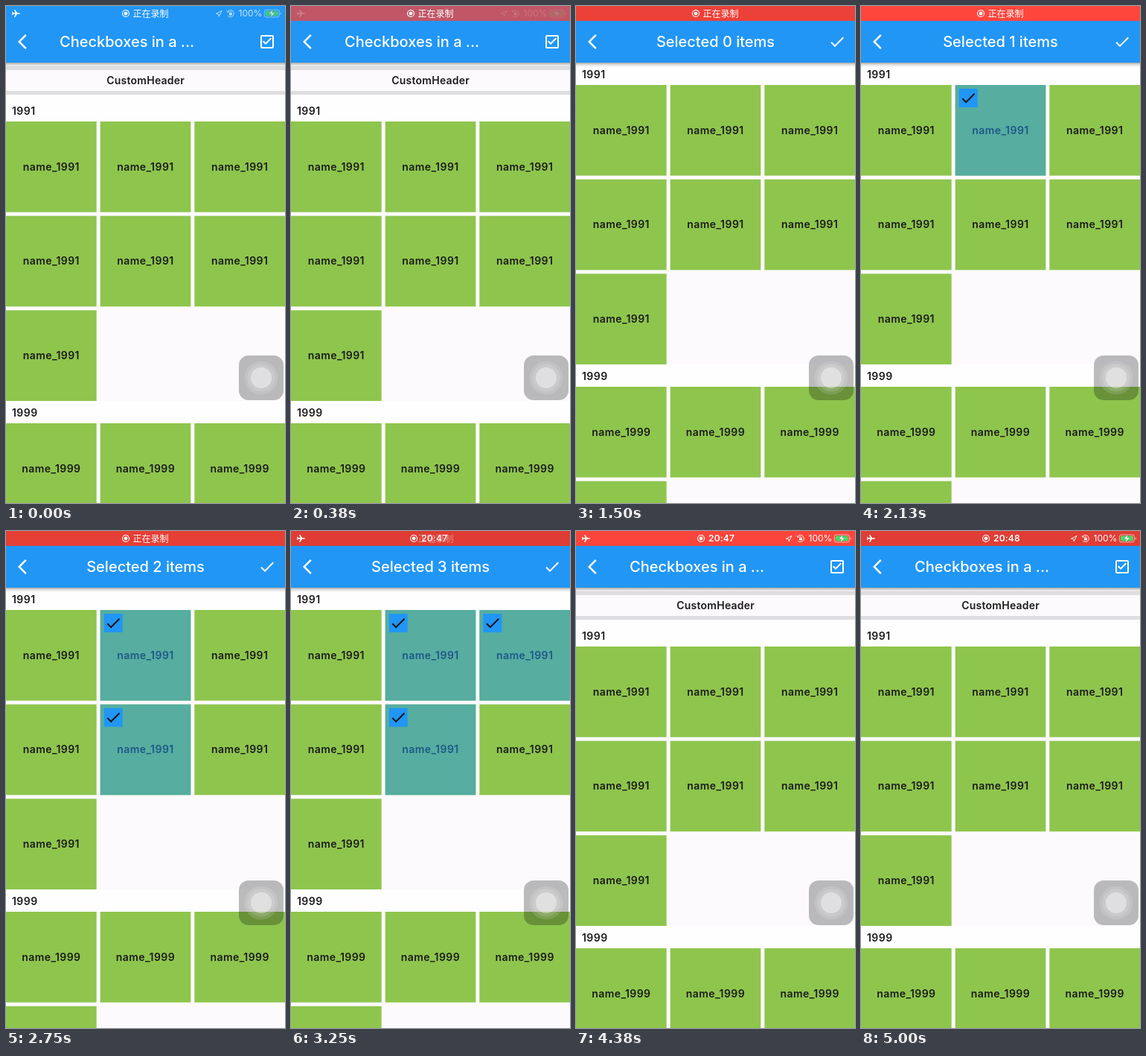
Recreate the animation shown at these times as an HTML page. Size 375 px wide and 667 px high, loop 5.12 s.

```html
<!DOCTYPE html>
<html lang="en">
<head>
<meta charset="utf-8">
<title>Checkbox grid</title>
<style>
html, body { margin: 0; width: 100%; height: 100%; overflow: hidden; background: #fcfafd; }
svg { display: block; width: 375px; height: 667px; }
text { font-family: Inter, Roboto, sans-serif; }
.label { font-size: 14px; font-weight: 600; letter-spacing: .45px; fill: #1b1b1b; }
.title { font-size: 20px; font-weight: 500; fill: #fff; }
.bar { font-size: 12px; fill: #fff; }
.cjk { font-family: "Noto Sans CJK SC", "Noto Sans CJK", sans-serif; }
.clock { font-weight: 600; letter-spacing: .2px; }
.mid { text-anchor: middle; }
</style>
</head>
<body>
<svg id="stage" viewBox="0 0 375 667">
  <defs>
    <linearGradient id="shade" x2="0" y2="1">
      <stop offset="0" stop-opacity=".34"/>
      <stop offset=".45" stop-opacity=".12"/>
      <stop offset="1" stop-opacity="0"/>
    </linearGradient>
    <path id="tick" d="M9 16.17L4.83 12l-1.42 1.41L9 19 21 7l-1.41-1.41z"/>
  </defs>
  <rect width="375" height="667" fill="#fcfafd"/>
  <g id="custom">
    <rect y="76" width="375" height="5" fill="#fafafa"/>
    <rect y="81" width="375" height="5" fill="#dedde0"/>
    <rect y="114" width="375" height="5" fill="#dedde0"/>
    <rect y="119" width="375" height="6" fill="#fefefe"/>
    <text class="label mid" x="187.7" y="105" style="letter-spacing:.25px">CustomHeader</text>
  </g>
  <g id="list"></g>
  <rect y="76" width="375" height="6" fill="url(#shade)"/>

  <rect y="20" width="375" height="56" fill="#2196f5"/>
  <path transform="translate(16 36)" fill="#fff" d="M11.67 3.87L9.9 2.1 0 12l9.9 9.9 1.77-1.77L3.54 12z"/>
  <g id="plain">
    <text class="title" x="72" y="55">Checkboxes in a ...</text>
    <g transform="translate(339 36)" fill="none" stroke="#fff" stroke-width="2">
      <rect x="4" y="4" width="16" height="16" rx="1"/>
      <path d="M6.7 11.3L10 14.6 17.3 7.3"/>
    </g>
  </g>
  <g id="picking">
    <text id="count" class="title mid" x="187.5" y="55"></text>
    <use href="#tick" x="339" y="36" fill="#fff"/>
  </g>

  <rect width="375" height="20" fill="#2196f5"/>
  <rect id="red" width="375" height="20"/>
  <path id="plane" fill="#fff" transform="translate(7.5 4.5)"
    d="M11.5 5.5Q11.5 4.7 10.4 4.7H7.6L4.7 .5H3.5L5 4.7H2.4L1.3 3.3H.4L1 5.5 .4 7.7H1.3L2.4 6.3H5L3.5 10.5H4.7L7.6 6.3H10.4Q11.5 6.3 11.5 5.5z"/>
  <g id="rec">
    <circle cy="10" r="4.5" fill="none" stroke="#fff" stroke-width="1.1"/>
    <circle cy="10" r="2.4" fill="#fff"/>
  </g>
  <text id="recText" class="bar cjk" x="170.5" y="14.5">正在录制</text>
  <text id="clock" class="bar clock" y="14.4"></text>
  <g id="right">
    <path d="M282.3 10.3L290 6.4 286.2 14 285.7 10.8z" fill="none" stroke="#fff" stroke-width=".9"/>
    <g fill="none" stroke="#fff">
      <path d="M298 7.3A4.6 4.6 0 1 1 298.2 13.1M296.7 6.3L298 8.6 300.2 7.5" stroke-width=".9"/>
      <path d="M300.8 9.7V8.7A1.1 1.1 0 0 1 303 8.7V9.7" stroke-width=".8"/>
    </g>
    <rect x="300" y="9.6" width="3.8" height="3" rx=".5" fill="#fff"/>
    <text class="bar" x="312.5" y="14.3">100%</text>
    <rect x="347.3" y="5" width="20" height="10" rx="2.6" fill="none" stroke="#fff" stroke-opacity=".6"/>
    <rect x="348.8" y="6.5" width="17" height="7" rx="1.4" fill="#4cd964"/>
    <path d="M368.7 8.2Q370 8.8 370 10T368.7 11.8z" fill="#fff" opacity=".6"/>
    <path d="M359 4.5L353 10.7H356.7L355.2 15.5 361.6 9.1H357.8z" fill="#fff" stroke="#2b8f55" stroke-width=".5"/>
  </g>

  <rect x="313" y="469" width="60" height="60" rx="13" fill="#000" fill-opacity=".265"/>
  <g fill="#fff">
    <circle cx="343" cy="499" r="22.5" fill-opacity=".13"/>
    <circle cx="343" cy="499" r="18.5" fill-opacity=".13"/>
    <circle cx="343" cy="499" r="14" fill-opacity=".4"/>
  </g>
</svg>
<script>
const LOOP = 5120, STEP = 125;
const ENTER = 1130, LEAVE = 4380, SHIFT = -49;
const TILE = 365 / 3, PITCH = TILE + 5;
// tile index in the first section -> time it is ticked
const picks = { 1: 1880, 4: 2380, 2: 2880, 3: 3500 };

const $ = id => document.getElementById(id);
const list = $('list');
const overlays = {};

function add(parent, tag, attrs, text) {
  const el = document.createElementNS('http://www.w3.org/2000/svg', tag);
  for (const key in attrs) el.setAttribute(key, attrs[key]);
  if (text) el.textContent = text;
  parent.appendChild(el);
  return el;
}

function section(year, top, total) {
  add(list, 'rect', { y: top, width: 375, height: 30, fill: '#fefefe' });
  add(list, 'text', { class: 'label', x: 8, y: top + 21 }, year);
  for (let i = 0; i < total; i++) {
    const x = i % 3 * PITCH, y = top + 30 + Math.floor(i / 3) * PITCH;
    const box = { x, y, width: TILE, height: TILE };
    add(list, 'rect', { ...box, fill: '#8ec54d' });
    add(list, 'text', { class: 'label mid', x: x + TILE / 2, y: y + 65.6 }, 'name_' + year);
    if (year === '1991' && picks[i]) {
      const g = overlays[i] = add(list, 'g', {});
      add(g, 'rect', { ...box, fill: '#2196f3', 'fill-opacity': .5 });
      add(g, 'rect', { x: x + 5, y: y + 5, width: 25, height: 25, fill: '#2196f5' });
      add(g, 'use', { href: '#tick', x: x + 5.5, y: y + 5.5, fill: '#141414' });
    }
  }
}
section('1991', 125, 7);
section('1999', 530, 4);

const ramp = (t, a, b) => Math.min(1, Math.max(0, (t - a) / (b - a)));
const show = (el, on) => el.setAttribute('display', on ? 'inline' : 'none');
const fade = (id, value) => $(id).setAttribute('opacity', value);

function statusBar(t) {
  const start = ramp(t, 0, 500);
  const swap = ramp(t, 3060, 3380);
  const pulse = (1 - Math.cos((t - 1000) / 2100 * 2 * Math.PI)) / 2;
  const mix = (a, b) => Math.round(a + (b - a) * pulse);
  $('red').setAttribute('fill', `rgb(${mix(220, 255)},${mix(60, 70)},${mix(52, 61)})`);
  fade('red', start);
  fade('plane', t < 2000 ? 1 - start : ramp(t, 3000, 3250));
  fade('right', t < 2000 ? .75 * (1 - start) : ramp(t, 3250, 3500));
  fade('recText', 1 - swap);
  fade('clock', ramp(t, 3060, 3270));
  const slide = 7 * swap;
  $('rec').setAttribute('transform', `translate(${161 + slide} 0)`);
  $('clock').setAttribute('x', 171 + slide);
  $('clock').textContent = t < 4630 ? '20:47' : '20:48';
}

function render(t) {
  const picking = t >= ENTER && t < LEAVE;
  let count = 0;
  for (const i in picks) {
    const on = picking && t >= picks[i];
    show(overlays[i], on);
    count += on;
  }
  show($('custom'), !picking);
  show($('plain'), !picking);
  show($('picking'), picking);
  $('count').textContent = `Selected ${count} items`;
  list.setAttribute('transform', `translate(0 ${picking ? SHIFT : 0})`);
  statusBar(t);
}

function snap(t) {
  const at = n => n * STEP + n % 2 * 5;
  const n = Math.min(40, Math.floor(t / STEP));
  return t < at(n) ? at(n - 1) : at(n);
}

const begin = performance.now();
function tick() {
  render(snap((performance.now() - begin) % LOOP));
  requestAnimationFrame(tick);
}
tick();
</script>
</body>
</html>
```
